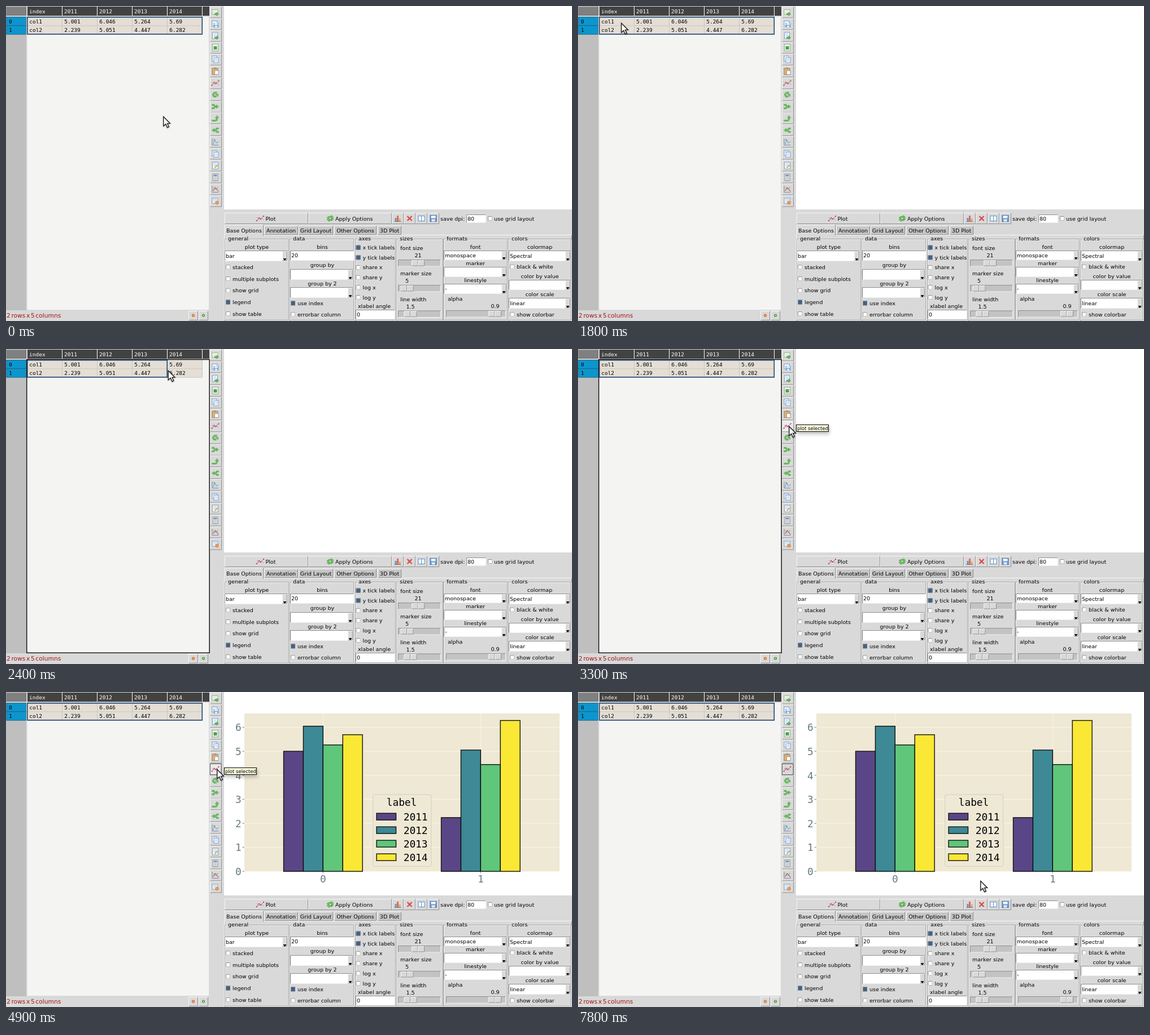
An HTML page for the animation above (8000 ms loop, 1002 by 559 pixels).

```html
<!DOCTYPE html>
<html lang="en">
<head>
<meta charset="utf-8">
<title>Table plot</title>
<style>
html, body { margin: 0; width: 100%; height: 100%; overflow: hidden; background: #d9d9d9; }
svg { display: block; width: 100%; height: 100%; }
text { font-family: "DejaVu Sans", sans-serif; font-size: 9.5px; white-space: pre; }
.mono { font-family: "DejaVu Sans Mono", monospace; }
.tight { word-spacing: -1.8px; }
</style>
</head>
<body>
<svg id="stage" viewBox="0 0 1002 559" xmlns="http://www.w3.org/2000/svg"></svg>
<script>
const BG = '#d9d9d9', LIGHT = '#f6f6f6', SHADE = '#8f8f8f';
const COLS = [37, 99, 161, 223, 285, 347];
const HEAD = ['index', '2011', '2012', '2013', '2014'];
const ROWS = [['col1', 5.001, 6.046, 5.264, 5.69], ['col2', 2.239, 5.051, 4.447, 6.282]];
const BAR_FILL = ['#5a4686', '#3d8995', '#5fc67a', '#fbe835'];

const rect = (x, y, w, h, fill, more = '') =>
  `<rect x="${x}" y="${y}" width="${w}" height="${h}" fill="${fill}" ${more}/>`;
const box = (x, y, w, h, fill, stroke, sw = 1, more = '') =>
  rect(x, y, w, h, fill, `stroke="${stroke}" stroke-width="${sw}" ${more}`);
const path = (d, stroke, sw = 1, fill = 'none') =>
  `<path d="${d}" fill="${fill}" stroke="${stroke}" stroke-width="${sw}"/>`;
const text = (x, y, s, { at = 'start', size = 9.5, fill = '#000', cls = '' } = {}) =>
  `<text x="${x}" y="${y}" text-anchor="${at}" fill="${fill}" class="${cls}" style="font-size:${size}px">${s}</text>`;
const mid = (x, y, s) => text(x, y, s, { at: 'middle' });
const group = (id, body) => `<g id="${id}">${body}</g>`;
const at = (x, y, body) => `<g transform="translate(${x} ${y})">${body}</g>`;

function bevel(x, y, w, h, fill = BG, tl = LIGHT, br = SHADE) {
  return rect(x, y, w, h, fill) +
    path(`M${x + .5} ${y + h - .5}V${y + .5}H${x + w - .5}`, tl) +
    path(`M${x + .5} ${y + h - .5}H${x + w - .5}V${y + .5}`, br);
}
const field = (x, y, w, h, s = '') =>
  bevel(x, y, w, h, '#fff', SHADE, '#eee') + text(x + 2, y + h / 2 + 3.3, s);
function combo(x, y, w, h, s = '') {
  const ax = x + w - 5, ay = y + h - 5;
  return field(x, y, w, h, s) + bevel(ax - 5, y + 1, 9, h - 2) +
    path(`M${ax - 3.5} ${ay}h6l-3 4z`, 'none', 0, '#000');
}
function check(x, y, s, on = false, gap = 7.5) {
  return bevel(x, y - 4, 8, 8, on ? '#43607f' : '#fff', SHADE, on ? '#5d7691' : '#bbb') +
    text(x + 8 + gap - 3.5, y + 3.5, s);
}
function frame(x, w, title, tw) {
  const d = `M${x + 4} 413.5H${x + .5}V557.5H${x + w - .5}V413.5H${x + 6 + tw}`;
  return at(1, 1, path(d, '#f2f2f2')) + path(d, '#a6a6a6') + text(x + 6, 416, title);
}
function slider(x, y, w, thumb) {
  return bevel(x, y, w, 12.5, '#c3c3c3', SHADE, LIGHT) + bevel(thumb, y + 1, 11.5, 10.5) +
    bevel(thumb + 11.5, y + 1, 11.5, 10.5);
}

// Icons are drawn around their own centre.
const sheet = (x, y, w, h, fill = '#f1f6fc', line = '#7ea3cf') => box(x, y, w, h, fill, line);
const lines = (x, y, w, n, c = '#b3cae6') =>
  Array.from({ length: n }, (_, i) => path(`M${x} ${y + i * 2.5}h${w}`, c)).join('');
const go = (x, y) => path(`M${x} ${y - 1}h3.500v-2l3.500 3.200-3.500 3.200v-2h-3.500z`, '#3d8f36', .6, '#62b84f');
const green = (line, tip) => path(line, '#3f9a3a', 2.8) + path(line, '#7ccc69', 1.4) +
  path(tip, '#3f9a3a', .7, '#7ccc69');
const curve = path('M-6-2L-2 2 2-1 6 3', '#8f9dcb', 1) + path('M-6 4L-2-1 1 1 6-4', '#dc5868', 1) +
  [[-6, 4], [-2, -1], [1, 1], [6, -4]].map(([x, y]) => rect(x - 1, y - 1, 2, 2, '#d23a4d')).join('');
const axes = path('M-5.500-6V5.500H6', '#6f8db4', 1);
const floppy = box(-5.5, -5.5, 11, 11, '#6d9cd6', '#3c6fae') + rect(-4, -5, 8, 4.5, '#f3f7fc') + rect(-3, 1.5, 6, 4, '#e4ecf5');
const refresh = green('M-5 0Q-3-4 3-2.500', 'M2-5.500L6-2 2 .5z') + green('M5 0Q3 4-3 2.500', 'M-2 5.500L-6 2-2-.5z');
const copy = sheet(-5.5, -6, 8, 9) + sheet(-2.5, -3, 8, 9) + lines(-1, 0, 5, 2);
const ICONS = [
  sheet(-5.5, -4.5, 10, 8, '#f8fbf4', '#9cb391') + lines(-4, -2, 7, 2, '#c6d8bc') + go(-1, 3),
  sheet(-5.5, -5.5, 9, 9) + rect(-3, -2, 9, 8, '#7ea8dc') + rect(-1.5, -1.5, 6, 3, '#f3f7fc') + rect(-.5, 3, 4, 3, '#e4ecf5'),
  sheet(-5, -6, 9, 11) + lines(-3, -3, 5, 2) + go(-1, 3),
  sheet(-5, -6, 10, 12, '#f6faf4', '#8fae86') + rect(-3, -2.5, 6, 6, '#4d9f50'),
  copy,
  box(-5.5, -5, 10, 11, '#dfb274', '#a97c42') + rect(-2.5, -6.5, 4, 3, '#999') + sheet(-1, -1, 6.5, 7, '#fff', '#9b9b9b'),
  curve,
  green('M3-3.500Q-3-5-4 0Q-3 4 2 3', 'M0-1H5V3z'),
  green('M-6-3H-3L0 0H3M-6 3H-3L0 0', 'M2-3L6 0 2 3z'),
  green('M-6 4H0Q3 4 3 0V-1', 'M0-1L3-5 6-1z'),
  green('M6-3H3L0 0H-3M6 3H3L0 0', 'M-2-3L-6 0-2 3z'),
  axes + path('M-4 4L-1-4 2 2 6-1', '#5c95cf', 1) + rect(-3, -5, 2.5, 2.5, '#6cb266'),
  copy + lines(-4, -4, 5, 1),
  sheet(-5, -6, 10, 12) + lines(-3, -3, 6, 2) + path('M-1 4L4-1', '#e2b546', 2.4),
  box(-4.5, -6, 9, 12, '#ededed', '#8793a0') + rect(-3, -4.5, 6, 2.5, '#6f8cb0') + lines(-3, 0, 6, 3, '#a0a6ac'),
  axes + path('M-4 3L0-3 6 4', '#d5545e', 1.2) + path('M-4-4L1 1 5-4', '#69ab6f', 1),
  sheet(-5.5, -5, 10, 9) + lines(-4, -2.500, 7, 2) + `<circle cx="3" cy="3" r="2.900" fill="#f09a4a" stroke="#d27a33" stroke-width=".7"/>`
];
const toolY = i => 11 + i * 20.94;

function table() {
  let s = rect(0, 0, 36, 540, '#bfbfbf') + rect(0, 17, 360, 2, BG) +
    bevel(0, 1, 36, 16, '#808080', '#9c9c9c', '#6d6d6d') +
    rect(37.5, 18.5, 321.5, 520.5, '#f4f4f3') + rect(38, 1, 322, 16.3, '#424242') + rect(38, 19.5, 310, 31, '#e4ded5');
  const names = ROWS.map((row, r) => {
    const y = 19.5 + r * 15.4;
    return group('head' + r, box(.8, y, 34.4, 15.4, '#0c96cd', '#1b5f7d', .8)) +
      text(5, y + 11.5, r, { cls: 'mono' }) +
      row.map((v, c) => text(COLS[c] + 4.2, y + 11.5, v, { cls: 'mono' })).join('');
  }).join('');
  s += COLS.slice(1).map(x => path(`M${x + .5} 1V17`, '#fff') + path(`M${x + .5} 19V50`, '#c4c0b9', .8)).join('') +
    path('M38 35H347', '#c4c0b9', .8) + path('M38 50.500H347', '#c4c0b9', .8);
  s += HEAD.map((h, c) => text(COLS[c] + 4, 13, h, { cls: 'mono', fill: '#fff' })).join('');
  return s + names + box(36.7, 18.7, 323.5, 520.5, 'none', '#111', 1.4, 'id="focus"') +
    box(37.8, 19.8, 309.5, 30.2, 'none', '#1c4775', 1.6, 'id="sel"');
}

function toolbar() {
  let s = rect(361, 0, 25, 559, BG);
  ICONS.forEach((icon, i) => {
    const y = Math.round(toolY(i)) - 10;
    s += bevel(361, y, 21, 20.5);
    if (i === 5) s += group('hot5', bevel(361, y, 21, 20.5, '#ececec'));
    if (i === 6) s += group('hot6', bevel(361, y, 21, 20.5, '#ececec')) +
      group('sunk', bevel(361, y, 21, 20.5, '#ececec', '#6d6d6d', '#fff')) +
      group('ring', box(361.5, y + .5, 19.5, 19.5, 'none', '#5a5a5a'));
    s += at(370.5, toolY(i), icon);
  });
  return s;
}

function status() {
  const dot = (x, c) => bevel(x - 8.5, 541, 17, 17) +
    `<circle cx="${x}" cy="549" r="2.600" fill="${c}"/><circle cx="${x}" cy="549" r=".9" fill="#fff"/>`;
  return rect(0, 540, 361, 19, BG) +
    text(1, 553, '2 rows x 5 columns', { size: 10.7, fill: '#a31515', cls: 'tight' }) +
    dot(331.5, '#d9641a') + dot(349.5, '#4c9c2e');
}

function controls() {
  let s = rect(386, 361, 616, 198, BG);
  s += bevel(387, 367, 148, 20) + bevel(535, 367, 148, 20) + at(450, 377, curve) + text(459.5, 380.5, 'Plot') +
    at(574, 377, refresh) + text(583, 380.5, 'Apply Options');
  const small = [
    rect(-5, -1, 3, 6, '#6a90cc') + rect(-1.5, -5, 3, 10, '#de6b55') + rect(2, 0, 3, 5, '#eba556') + path('M-6 5.500H6', '#777'),
    path('M-4-4L4 4M4-4L-4 4', '#dd4444', 2.2),
    box(-5.5, -4.5, 11, 9, '#f4f8fd', '#5f92cb') + path('M0-4V4', '#5f92cb'),
    floppy
  ];
  small.forEach((icon, i) => { s += bevel(683 + i * 21, 367, 21, 20) + at(693.5 + i * 21, 377, icon); });
  s += text(769, 380.5, 'save dpi:') + field(815, 370, 35, 15, '80') + check(853, 377, 'use grid layout', false, 6.5);

  s += bevel(386, 406, 616, 153, BG, LIGHT, SHADE);
  [['Base Options', 387, 69], ['Annotation', 457, 60], ['Grid Layout', 518, 61], ['Other Options', 581, 75], ['3D Plot', 658, 42]]
    .forEach(([name, x, w], i) => {
      const y = i ? 390 : 388, h = i ? 16 : 20;
      s += bevel(x, y, w, h, i ? '#c6c6c6' : BG);
      if (!i) s += rect(x + 1, 405, w - 2, 4, BG);
      s += mid(x + w / 2, 401.5, name);
    });

  s += frame(387, 114, 'general', 38) + mid(444, 430.5, 'plot type') + combo(387, 434, 112, 19, 'bar');
  ['stacked', 'multiple subplots', 'show grid', 'legend', 'show table']
    .forEach((n, i) => { s += check(389, 463.3 + i * 20.7, n, i === 3); });

  s += frame(502, 114, 'data', 22) + mid(560, 430.5, 'bins') + field(503, 434, 113, 18, '20') +
    mid(560, 463, 'group by') + combo(503, 467, 112, 19) + mid(560, 496, 'group by 2') + combo(503, 499, 112, 19) +
    check(504, 527.3, 'use index', true) + check(504, 547.3, 'errorbar column');

  s += frame(618, 72, 'axes', 22);
  ['x tick labels', 'y tick labels', 'share x', 'share y', 'log x', 'log y']
    .forEach((n, i) => { s += check(619.5, 428.5 + i * 17.7, n, i < 2); });
  s += mid(652, 536, 'xlabel angle') + field(619, 539, 70, 17, '0');

  s += frame(691, 83, 'sizes', 24) + text(698, 432.5, 'font size') + mid(729.5, 445.5, '21') + slider(694, 450, 76, 718) +
    text(698, 477.5, 'marker size') + mid(710, 491, '5') + slider(694, 495, 76, 698.5) +
    text(698, 523.5, 'line width') + mid(716, 536.5, '1.5') + slider(694, 540.5, 76, 704.5);

  s += frame(774, 114, 'formats', 37) + mid(831, 430.5, 'font') + combo(775, 434, 112, 17, 'monospace') +
    mid(831, 460, 'marker') + combo(775, 463, 112, 18) + mid(831, 490, 'linestyle') + combo(775, 493, 112, 18, '-') +
    text(782, 523, 'alpha') + mid(866, 536, '0.9') + slider(779, 540, 106, 854);

  return s + frame(889, 112, 'colors', 29) + mid(945, 430.5, 'colormap') + combo(890, 434, 110, 19, 'Spectral') +
    check(892, 462.5, 'black &amp; white') + mid(945, 482.5, 'color by value') + combo(890, 486, 110, 18) +
    mid(945, 515, 'color scale') + combo(890, 518, 110, 19, 'linear') + check(892, 547.3, 'show colorbar');
}

function plot() {
  const base = 318.3, unit = 42.62, size = 17.8, ink = '#657b83', bw = 34.9;
  const centers = [561.3, 840.3];
  let s = rect(422, 38, 558, 280.3, '#eee8d5');
  for (let v = 0; v <= 6; v++) {
    const y = base - v * unit;
    s += path(`M422 ${y}H980`, '#fdf6e3') + path(`M418.500 ${y}H422`, ink, .9) +
      text(416.6, y + 6.7, v, { at: 'end', size, fill: ink, cls: 'mono' });
  }
  centers.forEach((x, i) => {
    s += path(`M${x} 38V${base}`, '#fdf6e3') + path(`M${x} ${base}v3.500`, ink, .9) +
      text(x, 338, i, { at: 'middle', size, fill: ink, cls: 'mono' });
  });
  centers.forEach((x, r) => BAR_FILL.forEach((fill, c) => {
    const h = ROWS[r][c + 1] * unit;
    s += box(x + (c - 2) * bw, base - h, bw, h, fill, '#111', 1.4);
  }));
  s += rect(649.7, 182, 103, 127.5, '#eee8d5', 'rx="3" stroke="#d3cec0"') +
    text(700.5, 202, 'label', { at: 'middle', size, cls: 'mono' });
  BAR_FILL.forEach((fill, i) => {
    const y = 215.2 + i * 24;
    s += box(656, y, 34.5, 12, fill, '#111', 1.4) + text(703.7, y + 12.3, HEAD[i + 1], { size, cls: 'mono' });
  });
  return s;
}

const tip = `<g style="filter:drop-shadow(1px 4px 3px rgba(0,0,0,.25))">${box(386.5, 134.5, 57, 12, '#ffffe0', '#000')}</g>` +
  text(388, 143.6, 'plot selected', { size: 8.5 });
const arrow = `<g style="filter:drop-shadow(0 1px 1px rgba(0,0,0,.25))">` +
  path('M.8 1.500V18L4.700 14.500 7.700 20.700 10.400 19.400 7.500 13.400H12.500Z', '#222', 1.4, '#fff') + '</g>';

document.getElementById('stage').innerHTML = rect(0, 0, 1002, 559, BG) + toolbar() + table() + status() +
  rect(386, 0, 616, 361, '#fff') + group('plot', plot()) + controls() + group('tip', tip) + group('cursor', arrow);

// Pointer moves: start time, number of 100 ms steps, end point.
const MOVES = [
  [200, 6, 145, 81], [1200, 7, 76, 29], [2000, 1, 149, 37], [2100, 4, 286.5, 37],
  [3100, 1, 371, 136], [3300, 1, 373, 136], [5900, 1, 371, 135], [6100, 1, 371, 110],
  [6300, 1, 446, 107], [6800, 1, 523, 290], [7000, 1, 556, 325], [7200, 1, 570, 340],
  [7400, 1, 569, 339], [7600, 1, 585, 338], [7800, 1, 712, 334]
];
function pointer(t) {
  let x = 278, y = 195;
  for (const [start, n, tx, ty] of MOVES) {
    if (t < start) break;
    const p = Math.min(1, (Math.floor((t - start) / 100) + 1) / n);
    const k = p * p * (3 - 2 * p);
    x += (tx - x) * k;
    y += (ty - y) * k;
  }
  return [x, y];
}

const el = id => document.getElementById(id);
const show = (id, on) => el(id).setAttribute('visibility', on ? 'visible' : 'hidden');

function draw(t) {
  const within = (a, b) => t >= a && t < b;
  const [x, y] = pointer(t);
  el('cursor').setAttribute('transform', `translate(${x} ${y})`);

  const dragging = within(1900, 3100);
  const right = dragging ? COLS.find(c => c > Math.min(x, 284)) : 347;
  const oneRow = within(1900, 2000);
  el('sel').setAttribute('width', right - 37.5);
  el('sel').setAttribute('height', oneRow ? 15 : 30.2);
  show('head1', !oneRow);
  show('focus', within(1900, 4400));

  show('hot5', within(6100, 6300));
  show('hot6', within(3100, 6100));
  show('sunk', within(4400, 4900));
  show('ring', t >= 4400);
  show('tip', within(3100, 6100));
  show('plot', t >= 4900);
}

const t0 = performance.now();
function tick(now) {
  draw(Math.max(0, now - t0) % 8000);
  requestAnimationFrame(tick);
}
draw(0);
requestAnimationFrame(tick);
</script>
</body>
</html>
```
